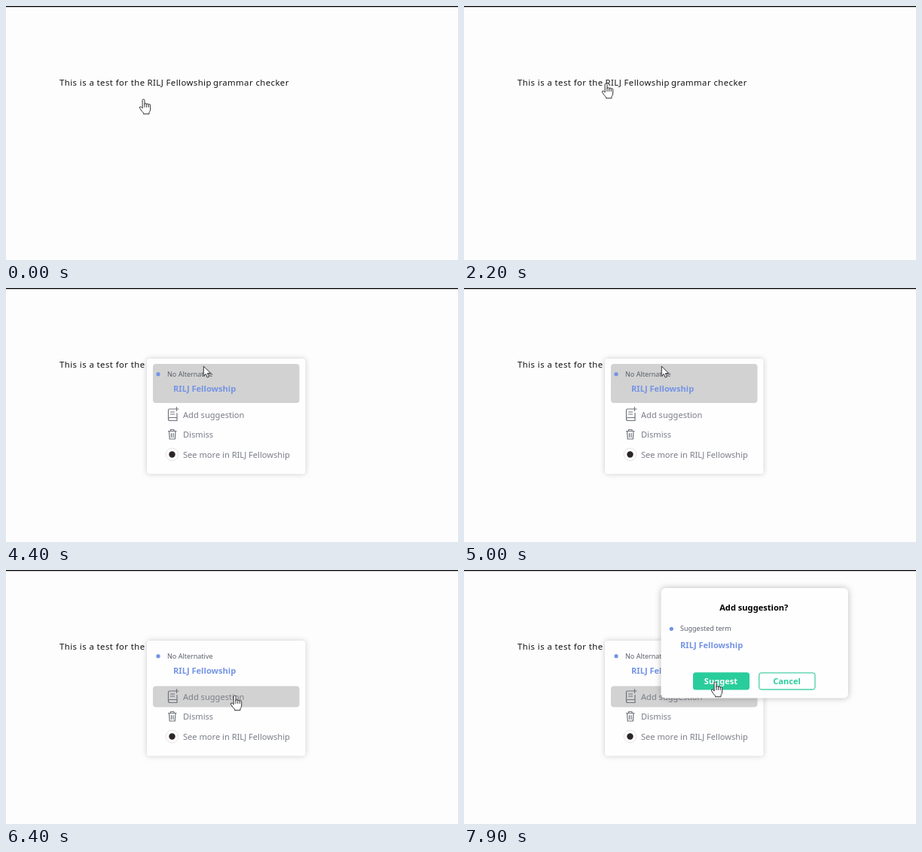
Recreate the animation shown at these times as an HTML page. Size 600 by 338 pixels, loop 8 s.

```html
<!DOCTYPE html>
<html lang="en">
<head>
<meta charset="utf-8">
<style>
  html, body { margin: 0; width: 100%; height: 100%; overflow: hidden; background: #fdfdfd; }
  svg { display: block; width: 600px; height: 338px; font-family: "Noto Sans", "Open Sans", sans-serif; }
  .line { font-size: 11.3px; letter-spacing: .45px; fill: #151515; }
  .item { font-size: 11.1px; fill: #7c7f89; }
  .small { font-size: 9px; fill: #5a5f6a; }
  .strong { font-size: 11.1px; font-weight: 700; }
  .blue { fill: #7594e4; }
  .mid { text-anchor: middle; }
  .card { fill: #fefefe; filter: drop-shadow(0 0 3.5px #0003); }
  #dialog .card { filter: drop-shadow(0 0 4.5px #0004); }
  .icon { fill: none; stroke: #70757c; stroke-width: 1.2; stroke-linecap: round; stroke-linejoin: round; }
  .cursor { fill: #fff; stroke: #333; stroke-linejoin: round; stroke-linecap: round; }
</style>
</head>
<body>
<svg viewBox="0 0 600 338">
  <rect width="600" height="1.3" fill="#000"/>
  <rect id="selection" x="187" y="93.5" height="17" fill="#bed8d4"/>
  <g class="line">
    <text x="71" y="106">This is a test for the</text>
    <text x="187.5" y="106">RILJ Fellowship</text>
    <text x="275" y="106">grammar checker</text>
  </g>

  <g id="menu">
    <rect class="card" x="187" y="94" width="210.5" height="153.5" rx="4"/>
    <rect id="hover" x="195" width="194.5" rx="4" fill="#d2d2d2"/>
    <circle class="blue" cx="202" cy="114.7" r="2.6"/>
    <text class="small" x="214" y="117.5">No Alternative</text>
    <text class="strong blue" x="222" y="138">RILJ Fellowship</text>
    <g class="icon">
      <path d="M224 161h-7q-1.5 0-1.5 1.5v12q0 2 2 2h9.5v-10M215.5 174q0-1.5 2-1.5h9.5M218.5 165h5M218.5 168h5M226.5 158.5v5M224 161h5"/>
      <path d="M215.5 190.5h10.5M218.5 190.5v-2h4.5v2M216.5 190.5l.7 10.5h7.1l.7-10.5M219.5 193.5v5M222 193.5v5"/>
    </g>
    <circle cx="220.5" cy="221.5" r="8.3" fill="#fff" stroke="#e4e4e6"/>
    <circle cx="220.5" cy="221.5" r="4.2" fill="#2b2529"/>
    <g class="item">
      <text x="235" y="172.5">Add suggestion</text>
      <text x="235" y="199">Dismiss</text>
      <text x="235" y="225.5">See more in RILJ Fellowship</text>
    </g>
  </g>

  <g id="dialog">
    <rect class="card" x="261.5" y="24" width="248.5" height="146.5" rx="6"/>
    <text class="strong mid" x="384.8" y="54">Add suggestion?</text>
    <circle class="blue" cx="275.3" cy="78.3" r="2.6"/>
    <text class="small" x="287" y="81">Suggested term</text>
    <text class="strong blue" x="287" y="104">RILJ Fellowship</text>
    <rect x="304" y="136.2" width="75" height="23.2" rx="3.5" fill="#29cd9b"/>
    <text class="strong mid" x="341" y="151.5" fill="#fff">Suggest</text>
    <rect x="391.7" y="136.8" width="74.3" height="22.2" rx="3.5" fill="#fff" stroke="#4bd0a8" stroke-width="1.3"/>
    <text class="strong mid" x="428.5" y="151.5" fill="#29cd9b">Cancel</text>
  </g>

  <path id="arrow" class="cursor" d="M.3 .5v12.500l2.900-2.700 2 4.700 2.200-.9-2-4.600h4z"/>
  <path id="hand" class="cursor" d="M-2 1.500q0-1.500 1.500-1.500T1 1.500V7q0-1.500 1.300-1.500t1.400 1.500q.2-1 1.300-1t1.300 1.500q.2-.8 1.200-.8t1.200 1.400V13q0 3-1.700 4.500v2.200H-.5v-1.500Q-3 16-5 12.500q-1.300-2 0-2.500t3 1.700zM1 7v3.500M3.700 7v3.500M6.300 7.500v3"/>
</svg>
<script>
const LOOP = 8000, STEP = 100, MENU = 4200, DIALOG = 6500;
// Pointer stops: time, x, y
const path = [
  [0, 183, 124], [500, 189, 103], [2200, 189, 103], [3000, 275, 103], [3200, 276, 104],
  [3900, 262, 104], [5100, 262, 104], [5600, 294, 160], [6100, 294, 160],
  [6400, 304, 167], [6500, 304, 167], [7200, 316, 166], [7900, 334, 149], [LOOP, 334, 149]
];
const el = id => document.getElementById(id);
const clamp = (v, max) => Math.max(0, Math.min(max, v));
const fade = (t, start) => clamp((t - start) / 200, 1);
const within = (t, from, to) => t >= from && t < to;

function pointerAt(t) {
  const i = path.findIndex(stop => stop[0] > t);
  const [t0, x0, y0] = path[i - 1], [t1, x1, y1] = path[i];
  const p = (t - t0) / (t1 - t0), k = p * p * (3 - 2 * p);
  return [x0 + (x1 - x0) * k, y0 + (y1 - y0) * k];
}

function draw(now) {
  const t = Math.floor(now % LOOP / STEP) * STEP;
  const [x, y] = pointerAt(t);

  const selected = t < 3000 ? x - 187 : 86;
  el("selection").setAttribute("width", within(t, 2300, MENU) ? clamp(selected, 86) : 0);
  el("menu").setAttribute("opacity", fade(t, MENU));
  el("dialog").setAttribute("opacity", fade(t, DIALOG));

  const first = t < 5500;
  el("hover").setAttribute("y", first ? 101 : 154.5);
  el("hover").setAttribute("height", first ? 52 : 28);

  const isArrow = within(t, 3100, 5500) || within(t, 6700, 7500);
  for (const id of ["arrow", "hand"]) {
    el(id).setAttribute("transform", `translate(${x} ${y})`);
    el(id).setAttribute("visibility", (id === "arrow") === isArrow ? "visible" : "hidden");
  }
  requestAnimationFrame(draw);
}
requestAnimationFrame(draw);
</script>
</body>
</html>
```
